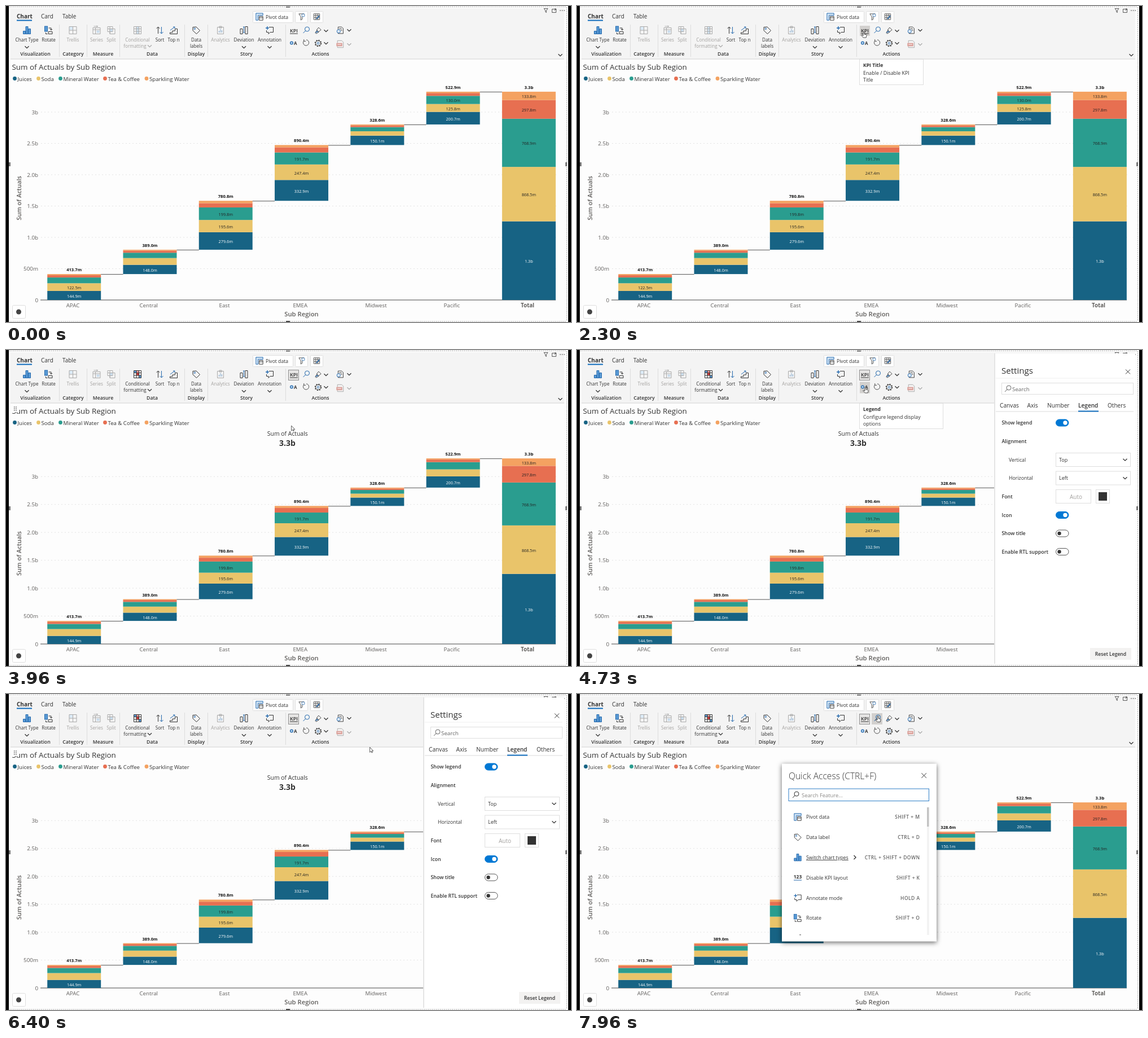
An HTML page that plays this animation: 1001 px wide and 560 px high, repeating every 8000 ms.

```html
<!DOCTYPE html>
<html lang="en">
<head>
<meta charset="utf-8">
<title>Stacked waterfall chart</title>
<style>
html, body { margin: 0; width: 100%; height: 100%; overflow: hidden; background: #000; }
svg { display: block; width: 1001px; height: 560px; font-family: "Open Sans", "Noto Sans", sans-serif; }
text { fill: #333; }
.b { font-weight: 700; }
.s { font-weight: 600; }
.mid { text-anchor: middle; }
.end { text-anchor: end; }
.ln { fill: none; stroke: #333; }
.bl { fill: none; stroke: #2368ad; }
.gr { fill: none; stroke: #aaa; }
.dim { fill: #a3a19f; }
.axis { fill: #605e5c; }
.box { fill: #fff; stroke: #dedede; }
.key { fill: #666; font-weight: 600; letter-spacing: .45px; }
</style>
</head>
<body>
<svg id="stage" viewBox="0 0 1001 560"></svg>
<script>
const LOOP = 8000;
const stage = document.getElementById('stage');
const names = ['Juices', 'Soda', 'Mineral Water', 'Tea & Coffee', 'Sparkling Water'];
const colors = ['#176384', '#e9c46a', '#2a9d8f', '#e76f51', '#f4a261'];
const regions = [
  ['APAC', 144.9, 122.5, 92, 36.3, 18],
  ['Central', 148, 108, 85, 33, 15],
  ['East', 279.6, 195.6, 199.8, 67.8, 38],
  ['EMEA', 332.9, 247.4, 191.7, 82, 36.4],
  ['Midwest', 150.1, 70, 66, 26, 16.5],
  ['Pacific', 200.7, 125.8, 130, 45.4, 21],
  ['Total', 1256.4, 868.5, 768.9, 297.8, 133.8]
];

const text = (x, y, str, size, cls = '', attr = '') =>
  `<text x="${x}" y="${y}" font-size="${size}" class="${cls}" ${attr}>${str.replace('&', '&amp;')}</text>`;
const rect = (x, y, w, h, fill, attr = '') =>
  `<rect x="${x}" y="${y}" width="${w}" height="${h}" fill="${fill}" ${attr}/>`;
const box = (x, y, w, h, attr = '') => `<rect class="box" x="${x}" y="${y}" width="${w}" height="${h}" ${attr}/>`;
const path = (d, cls = 'ln', attr = '') => `<path d="${d}" class="${cls}" ${attr}/>`;
const dot = (x, y, r, fill, attr = '') => `<circle cx="${x}" cy="${y}" r="${r}" fill="${fill}" ${attr}/>`;
const layer = (id, body, attr = '') => `<g id="${id}" ${attr}>${body}</g>`;
const chevron = (x, y, cls = 'ln') => path(`M${x - 3.5} ${y - 1.8}l3.5 3.5 3.5-3.5`, cls, 'stroke-width="1.3"');
const cross = (x, y, r) => path(`M${x - r} ${y - r}l${2 * r} ${2 * r}m0 ${-2 * r}l${-2 * r} ${2 * r}`);
const lens = (x, y, cls = 'ln') => path(`M${x - 5} ${y + 5}l4-4`, cls) +
  `<circle cx="${x + 2}" cy="${y - 2}" r="4" class="${cls}"/>`;

// Icons live in a 16 by 16 box.
const table = cls => path('M1.5 1.5h13v13h-13zM1.5 5.5h13m-13 4.5h13M6 1.5v13m4.5-13v13', cls);
const icons = {
  bars: path('M1.5 9.5h4v5h-4zM6 1.5h4v13H6zM10.5 5.5h4v9h-4z', 'bl', 'style="fill:#5b9bd5"'),
  rotate: rect(1, 1, 5, 9, '#5b9bd5', 'stroke="#2368ad"') + path('M7.5 10.5h7v4h-7zM8 4h4.5v4m-2-2 2 2 2-2M3 12v2.5h3'),
  trellis: rect(1.5, 1.5, 6, 6, '#dcebf7') + path('M1.5 1.5h13v13h-13zM8 1.5v13M1.5 8h13', 'gr'),
  series: path('M1.5 3.5h13v11h-13zM1.5 7h13M6 3.5v11M3 1h7m-2-1 2 1-2 1', 'gr') + rect(8, 8.5, 5, 4, '#c9dcec'),
  split: path('M1.5 1.5h9v9h-9zM5.5 5.5h9v9h-9zM5.5 1.5v13M1.5 5.5h13', 'gr') + rect(6, 6, 4, 4, '#c9dcec'),
  condOff: rect(6, 2, 4, 12, '#cfe0ee') + table('gr'),
  condOn: rect(2, 2, 4, 4, '#5b9bd5') + rect(6, 6, 5, 4, '#d83b3b') + rect(10, 10, 4, 4, '#5b9bd5') + rect(6, 2, 4, 3, '#e99') + table('ln'),
  sort: path('M5 14V2m-3 3 3-3 3 3') + path('M11 2v12m-3-3 3 3 3-3', 'bl'),
  topn: path('M1.5 14.5h13V5.5h-4v3.5H6v3H1.5z') + path('M2 8l8-6m-3 0h3v3', 'bl'),
  tag: path('M2 2.5l6-.5 6.5 6.5-6 6L2 8.5z') + `<circle cx="5.3" cy="5.3" r="1.3" class="bl"/>`,
  analytics: path('M2.5 2.5h11v12h-11zM6 1h4v3H6z', 'gr') + path('M5.5 12V9m2.5 3V6m2.5 6V8', 'bl', 'opacity=".55"'),
  deviation: path('M1.5 5.5h4v9h-4zM10.5 1.5h4v13h-4z') + path('M8 2v10M6.5 2h3m-3 10h3', 'bl'),
  annotate: path('M7 2.5h7.5v9H9l-3 3v-3H2.5V8') + path('M4 1v6M1 4h6', 'bl', 'stroke-width="1.4"'),
  pivot: path('M1.5 1.5h13v4h-9v9h-4z', 'bl', 'style="fill:#cfe3f5"') + path('M7.5 7.5h7v7h-7zM7.5 10h7'),
  funnel: path('M2 2h11L9 8v5l-3 2V8z') + `<circle cx="11" cy="5" r="3" class="bl" style="fill:#fff"/>`,
  edit: table('ln') + path('M7 13l7-7', 'bl', 'stroke-width="2"'),
  brush: path('M9 1l5 5-5 4-4-4zM6 6l-4 6 2 2 6-4', 'ln') + path('M3 12l3-3 2 2', 'bl', 'stroke-width="1.6"'),
  undo: path('M3 4a6 6 0 1 0 5-2M3 1v4h4'),
  gear: `<circle cx="8" cy="8" r="5" class="ln"/><circle cx="8" cy="8" r="6" class="ln" stroke-width="1.8" stroke-dasharray="2.3 2.4"/><circle cx="8" cy="8" r="2" class="bl"/>`,
  report: path('M4 1.5h7l3 3v10H4zM6 5h5M9 8h3') + `<circle cx="5" cy="10" r="3.4" class="bl" style="fill:#dceaf7"/>`,
  pdf: path('M3 6V1.5h8l3 3V14.5H3V12', 'gr') + rect(1, 6, 11, 6, '#dba09a') + rect(3, 8, 7, 1.5, '#f5dfdc')
};
const icon = (name, x, y, k = 1) => `<g transform="translate(${x - 8 * k} ${y - 8 * k}) scale(${k})">${icons[name]}</g>`;

function frame() {
  return rect(0, 0, 1001, 560, '#000') + rect(5, 0, 991, 560, '#fdfdfd') +
    rect(8, 4, 981, 90, '#f4f4f4') + rect(8, 93.5, 981, 1, '#d4d4d4') +
    path('M6 1.5H993M993.5 2V558M6 559H993', 'gr', 'stroke-dasharray="2 1.5"') +
    rect(496, 1, 7, 1.5, '#444') + rect(496, 558, 7, 2, '#444') +
    rect(5, 277, 3, 7, '#777') + rect(991, 277, 3, 7, '#777') +
    path('M953 4.5h7l-2.700 3.500v3.500l-1.600-1v-2.500zM967.500 5.500h7v6h-7zM971 8.500l3.500-3.500m-2.500 0h2.500v2.500', 'ln', 'stroke-width=".8"') +
    [982, 985.5, 989].map(x => dot(x, 8, .8, '#333')).join('');
}

function ribbon() {
  const groups = [['Visualization', 52], ['Category', 119], ['Measure', 172], ['Data', 259], ['Display', 337], ['Story', 426], ['Actions', 557]];
  const tools = [
    ['bars', 37, 'Chart Type'], ['rotate', 75.5, 'Rotate'], ['trellis', 118.5, 'Trellis', 1], ['series', 160.5, 'Series', 1],
    ['split', 186.5, 'Split', 1], ['sort', 272.5, 'Sort'], ['topn', 297, 'Top n'], ['tag', 337, 'Data'],
    ['analytics', 380, 'Analytics', 1], ['deviation', 421.5, 'Deviation'], ['annotate', 467, 'Annotation']
  ];
  const cond = (id, cls, name, line) => layer(id, icon(name, 233, 43) + text(233, 62.5, 'Conditional', 8.15, 'mid ' + cls) +
    text(228.5, 74, 'formatting', 8.15, 'mid ' + cls) + chevron(254.5, 71, line));
  return text(19, 21.500, 'Chart', 10, 'b') + rect(19, 24.5, 27, 2, '#0f6cbd') + text(62, 21.5, 'Card', 10) + text(100, 21.5, 'Table', 9.9) +
    box(437.5, 9.5, 71, 20, 'rx="1"') + box(512.5, 9.5, 22, 20, 'rx="1"') + box(539.5, 9.5, 22, 20, 'rx="1"') +
    icon('pivot', 449, 19, .95) + text(460, 22.700, 'Pivot data', 8.6) + icon('funnel', 524, 19, .85) + icon('edit', 550.5, 19, .8) +
    [94.5, 143.5, 201.5, 316.5, 357.5, 495.5].map(x => rect(x - .5, 33, 1, 57, '#dcdcdc')).join('') +
    groups.map(([s, x]) => text(x, 88, s, 8.7, 'mid s')).join('') +
    tools.map(([n, x, s, off]) => icon(n, x, 43) + text(x, 62.5, s, 8.15, 'mid' + (off ? ' dim' : ''))).join('') +
    text(337, 74, 'labels', 8.15, 'mid') +
    cond('condOff', 'dim', 'condOff', 'gr') + cond('condOn', '', 'condOn', 'ln') +
    layer('kpiHover', rect(501, 35, 18, 18, '#d2d0ce')) +
    layer('kpiOn', rect(500.5, 35.5, 18, 18, '#e6e5e4', 'stroke="#8f8f8f"')) +
    layer('legendHover', rect(501, 56.5, 18, 20, '#d2d0ce')) +
    layer('searchHover', rect(522, 34, 19, 20, '#d2d0ce')) +
    text(510, 46.500, 'KPI', 9, 'mid s') + rect(503, 48.500, 14, 1, '#333') +
    lens(531.5, 43, 'bl') + icon('brush', 553, 44, .85) +
    dot(506, 65.500, 2.4, '#b9d5ee', 'stroke="#2368ad" stroke-width="1.2"') + text(510, 68.500, 'A', 8, 'b') +
    icon('undo', 532, 65, .85) + icon('gear', 553, 66, .9) + icon('report', 592, 43, .9) + icon('pdf', 592, 67.5, .95) +
    [[37, 73], [421.5, 73], [467, 73], [567, 44], [567, 66], [608, 43]].map(p => chevron(...p)).join('') +
    chevron(608, 68, 'gr') + chevron(982, 87);
}

function heading() {
  let x = [15.5, 57.5, 96.5, 175.5, 249];
  return text(10.500, 113, 'Sum of Actuals by Sub Region', 13.4) +
    names.map((s, i) => dot(x[i], 128.500, 3.4, colors[i]) + text(x[i] + 5, 132.500, s, 9.6)).join('') +
    rect(61, 520.5, 913, 1, '#444') + text(523.500, 549.500, 'Sub Region', 11.3, 'mid s axis') +
    regions.map(([s], i) => text(118.5 + i * 134.25, 534, s, 9.700, 'mid axis' + (i > 5 ? ' b' : ''))).join('') +
    box(11.5, 530.5, 23, 23, 'rx="2"') + dot(22.500, 542, 4.5, '#444');
}

// k is pixels per million.
function chart(k) {
  const y = v => 521 - v * k, axisMid = (521 + y(3325.4)) / 2 + 4;
  let out = ['0', '500m', '1.0b', '1.5b', '2.0b', '2.5b', '3b'].map((s, i) =>
    text(57, y(i * 500) + 3.6, s, 9.8, 'end axis') +
    (i ? path(`M62 ${y(i * 500)}H975`, '', 'stroke="#e3e3e3" stroke-dasharray="2 4"') : '')).join('');
  out += text(0, 0, 'Sum of Actuals', 11, 'mid s axis', `transform="translate(27 ${axisMid}) rotate(-90)"`);
  let base = 0;
  regions.forEach(([, ...vals], i) => {
    const x = 73.200 + i * 134.28, c = x + 47.5;
    let v = i > 5 ? 0 : base;
    vals.forEach((d, j) => {
      const h = d * k;
      out += rect(x, y(v + d), 95, h, colors[j]);
      if (h > 13) out += text(c, y(v + d / 2) + 4, d > 1e3 ? '1.3b' : d.toFixed(1) + 'm', 7.3, 'mid', j ? 'style="fill:#222"' : 'style="fill:#fff"');
      v += d;
    });
    const sum = v - (i > 5 ? 0 : base);
    out += text(c, y(v) - 5, sum > 1e3 ? '3.3b' : sum.toFixed(1) + 'm', 7.600, 'mid b', 'style="fill:#111"');
    if (i < 6) out += path(`M${x + 95} ${y(v) + .5}h39.3`, 'ln', 'style="stroke:#555"');
    base = v;
  });
  return out;
}

const tip = (id, w, title, a, b) => layer(id, box(500.5, 94.5, w, 45) + text(507, 107.500, title, 8.600, 'b') +
  text(507, 121.500, a, 8.85) + text(507, 133.700, b, 8.85));

function settings() {
  const toggle = (y, on) => rect(848.5, y - 6, 22.5, 12, on ? '#0078d4' : '#fff', `rx="6" stroke="${on ? '#0078d4' : '#555'}"`) +
    dot(on ? 865 : 854.500, y, on ? 3.7 : 3.2, on ? '#fff' : '#333');
  const select = (y, s) => box(848.5, y - 12, 132, 24) + text(854, y + 3.300, s, 9) + chevron(971, y);
  const label = (y, s) => text(752.5, y + 3.200, s, 8.85, 's');
  return rect(739, 6, 2, 550, '#e4e4e4') + rect(741, 6, 248, 550, '#fff') + rect(742, 49.5, 244, 1, '#efefef') +
    text(752, 41.700, 'Settings', 15.1) + cross(976, 38.500, 4) +
    box(752.5, 58.5, 233, 20) + `<g opacity=".75">${lens(763, 69)}</g>` + text(771, 72.500, 'Search', 9.8, '', 'opacity=".75"') +
    text(749, 102, 'Canvas', 10.2) + text(797.5, 102, 'Axis', 10.2) + text(833, 102, 'Number', 10.2) +
    text(888, 102, 'Legend', 10.1, 's') + text(940, 102, 'Others', 10.1) +
    rect(742, 108.5, 244, 1, '#dcdcdc') + rect(888, 107.5, 36, 2, '#0f6cbd') +
    label(129, 'Show legend') + toggle(129, 1) + label(162, 'Alignment') +
    text(765, 197.500, 'Vertical', 8.8) + select(194.5, 'Top') + text(765, 230, 'Horizontal', 8.8) + select(227, 'Left') +
    label(260, 'Font') + box(848.5, 247.5, 62, 24) + text(884, 263.500, 'Auto', 10, 'mid dim') + box(919.5, 247.5, 24, 24) +
    rect(924, 252, 15, 15, '#333') + label(292.500, 'Icon') + toggle(292.5, 1) +
    label(325, 'Show title') + toggle(325, 0) + label(357.500, 'Enable RTL support') + toggle(357.5, 0) +
    rect(909, 528, 73, 21, '#f3f2f1') + text(945.5, 542, 'Reset Legend', 8.600, 'mid s');
}

function quickAccess() {
  const rows = [
    ['pivot', 'Pivot data', 'SHIFT + M'], ['tag', 'Data label', 'CTRL + D'], ['bars', 'Switch chart types', 'CTRL + SHIFT + DOWN'],
    ['', 'Disable KPI layout', 'SHIFT + K'], ['annotate', 'Annotate mode', 'HOLD A'], ['rotate', 'Rotate', 'SHIFT + O']
  ];
  return rect(363, 123.5, 274, 315, '#fff', 'style="filter:drop-shadow(0 2px 4px #0009)"') +
    text(375, 150.500, 'Quick Access (CTRL+F)', 15.600, '', 'font-weight="300"') + cross(614.7, 144.5, 4.3) +
    `<rect id="field" x="375" y="168" width="248.500" height="21.500" fill="#fff"/>` + lens(387, 179) +
    text(398, 182.500, 'Search Feature...', 9.4, '', 'style="fill:#8a8886"') +
    layer('caret', rect(398, 172, 1, 13, '#111')) +
    rows.map(([n, s, key], i) => {
      const y = 218 + i * 35.8, link = i === 2;
      return (n ? icon(n, 391, y, .95) : text(391, y + 2, '123', 8.4, 'mid b') + rect(384, y + 4, 14, 1, '#2368ad')) +
        text(406, y + 3.300, s, 8.85, '', link ? 'text-decoration="underline"' : '') +
        (link ? path(`M490.500 ${y - 3.5}l3.500 3.500-3.500 3.500`, 'ln', 'stroke-width="1.4"') : '') +
        text(607.5, y + 3.300, key, 8.5, 'key end');
    }).join('') +
    rect(394, 426.300, 3, 1, '#555') + rect(620, 200, 4, 227, '#f3f3f3') + rect(620, 201, 3.5, 34, '#c4c4c4');
}

const grip = rect(11, 98, 11, 12, '#fdfdfd') +
  [0, 1, 2, 3, 4, 5].map(i => dot(14.800 + i % 2 * 3.200, 101 + (i >> 1) * 3, .85, '#444')).join('');
const arrow = path('M0 0v9l2.100-1.900 1.300 2.700 1.300-.6-1.300-2.600h2.800z', '', 'fill="#fff" stroke="#333" stroke-width=".8"');
const hand = path('M-1 .8Q0-.6 1 .8V4.500l3.500 .8Q5.300 5.700 5 7l-.8 3.500h-5L-4 7q-.2-1.500 1.200-1L-1 7.300z', '', 'fill="#fff" stroke="#222" stroke-width=".8"');

stage.innerHTML = frame() + ribbon() + heading() + layer('chartTall', chart(.111)) +
  layer('chartKpi', chart(.0989) + text(498.800, 151.500, 'Sum of Actuals', 10.4, 'mid') + text(498.500, 169.500, '3.3b', 14, 'mid b')) +
  layer('grip', grip) + layer('settings', settings()) +
  tip('kpiTip', 113, 'KPI Title', 'Enable / Disable KPI', 'Title') +
  tip('legendTip', 148, 'Legend', 'Configure legend display', 'options') +
  layer('dialog', quickAccess()) + layer('cursor', layer('arrow', arrow) + layer('hand', hand));

// Start and end of each visible span, in ms.
const spans = {
  chartTall: [[0, 2460]], condOff: [[0, 2460]], chartKpi: [[2460, LOOP]], condOn: [[2460, LOOP]],
  kpiHover: [[1800, 2460]], kpiOn: [[2460, LOOP]],
  legendHover: [[2980, 3060], [4260, 5140]], searchHover: [[6900, LOOP]],
  kpiTip: [[2300, 2460]], legendTip: [[4600, 4760]], settings: [[4730, 7230]], dialog: [[7230, LOOP]],
  caret: [[7360, 7860]], grip: [[1500, 1740], [3090, 4060], [5200, 5440], [6360, 6620]], cursor: [[1260, LOOP]]
};

const ease = { in: p => p * p, out: p => p * (2 - p), both: p => p * p * (3 - 2 * p) };
const track = [
  [1260, 640, 575], [1830, 507, 47, 'both'], [2000, 507, 47], [2060, 508, 45.5], [2930, 508, 45.5],
  [3030, 502, 108.5, 'in'], [3230, 503, 168, 'out'], [3730, 503, 168], [4330, 511, 65.5, 'both'], [5100, 511, 65.5],
  [5340, 700, 111, 'in'], [5660, 923, 101, 'out'], [6200, 923, 101], [6400, 645, 94.500, 'in'], [6960, 530, 41, 'out'],
  [7760, 530, 41], [7960, 533, 39, 'both']
];
function pointer(t) {
  const i = track.findIndex(k => k[0] > t);
  if (i < 0) return track[track.length - 1].slice(1, 3);
  if (!i) return track[0].slice(1, 3);
  const a = track[i - 1], b = track[i], p = (t - a[0]) / (b[0] - a[0]);
  const q = b[3] ? ease[b[3]](p) : p;
  return [a[1] + (b[1] - a[1]) * q, a[2] + (b[2] - a[2]) * q];
}

const el = id => document.getElementById(id);
const show = (id, on) => { el(id).style.display = on ? '' : 'none'; };
function render(t) {
  for (const id in spans) show(id, spans[id].some(([a, b]) => t >= a && t < b));
  const [x, y] = pointer(t), onTool = x > 500 && x < 542 && y > 33 && y < 77;
  el('cursor').setAttribute('transform', `translate(${x} ${y})`);
  show('hand', onTool);
  show('arrow', !onTool);
  el('dialog').setAttribute('transform', t < 7260 ? 'translate(34.5 113)' : '');
  el('field').setAttribute('stroke', t < 7300 ? '#8a8886' : '#2f7fc8');
}

const start = performance.now();
(function tick() {
  render((performance.now() - start) % LOOP);
  requestAnimationFrame(tick);
})();
</script>
</body>
</html>
```
